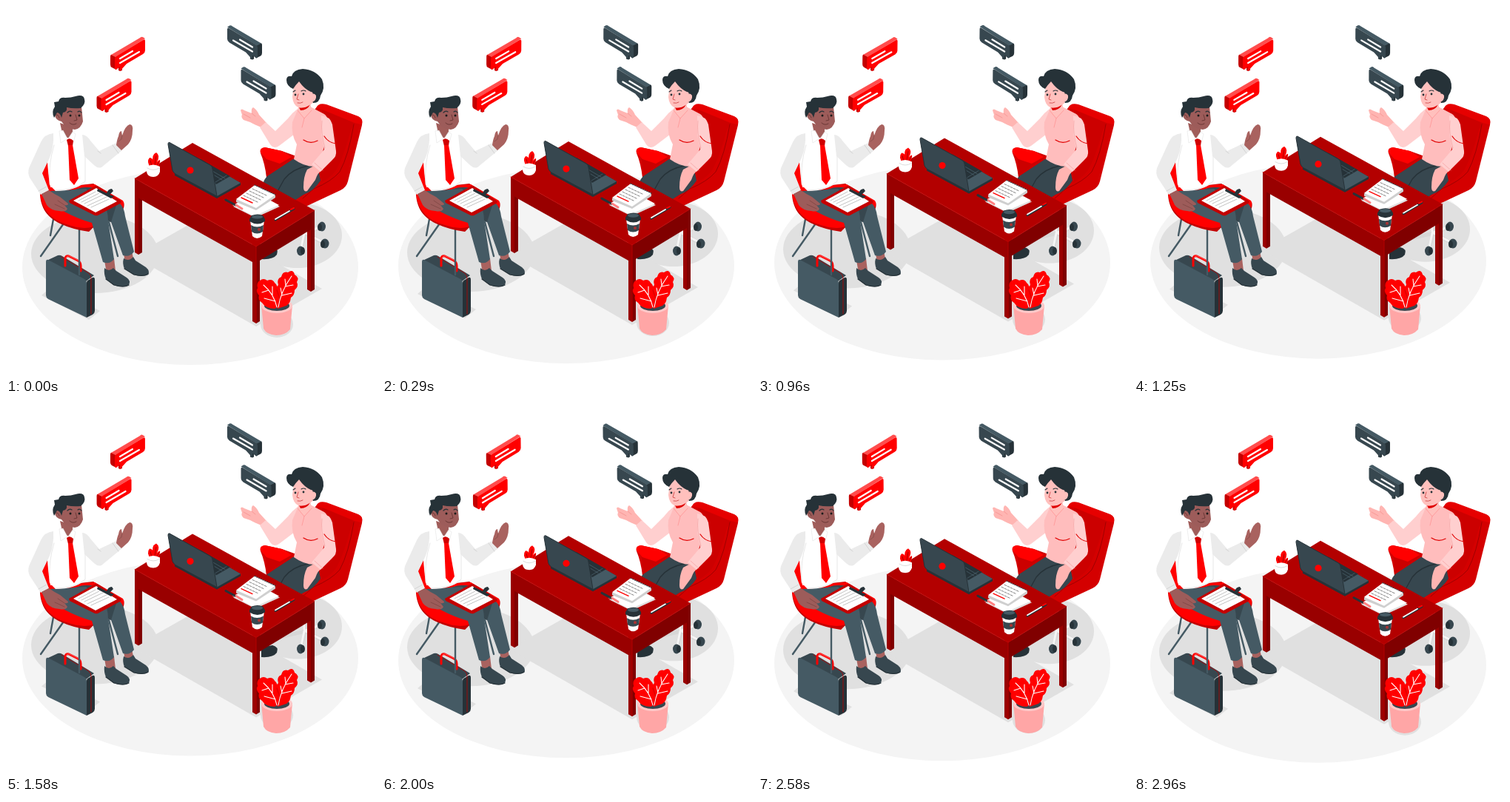
Write an HTML page that moves like this. It is 500x500 px and loops after 3000 ms.

```html
<!DOCTYPE html>
<html lang="en">
<head>
<meta charset="utf-8">
<title>Interview</title>
<style>
html, body { margin: 0; width: 100%; height: 100%; overflow: hidden; background: #fff; }
svg { display: block; width: 100vw; height: 100vh; }
.line { fill: none; stroke-linecap: round; stroke-linejoin: round; }
.red { --front: #f00; --top: #ff4d4d; --side: #c40000; }
.dark { --front: #37474f; --top: #455a64; --side: #263238; }
</style>
</head>
<body>
<svg viewBox="0 0 500 500">
<defs>
  <g id="bubble">
    <path fill="var(--side)" d="M141 68Q141 65 144 66L149 69V86L143 83Q141 82 141 79ZM152 82L157 78V87L154 88L152 87Z"/>
    <path fill="var(--top)" d="M142 66L181 43Q183 41 185 42L188 44L148 69Z"/>
    <path fill="var(--front)" d="M149 68L185 46Q188 44 188 47V60Q188 63 185 65L163 78L154 88V82L149 86Q147 86 147 84V72Q147 69 149 68Z"/>
    <path class="line" stroke="#fff" stroke-width="2.2" d="M154 71L171 61M154 77L180 62"/>
  </g>
</defs>

<g class="float">
  <ellipse cx="249" cy="353" rx="227" ry="132" fill="#f4f4f4"/>
  <g fill="#e0e0e0">
    <ellipse cx="120" cy="335" rx="86" ry="53"/>
    <ellipse cx="394" cy="310" rx="60" ry="44"/>
    <path d="M172 338L262 287L427 382L338 433Z"/>
    <path d="M48 391L62 379L127 412L112 424Z"/>
    <ellipse cx="366" cy="430" rx="22" ry="18"/>
  </g>
</g>

<!-- briefcase -->
<path fill="#37474f" d="M55 344L70 337Q73 336 76 338L119 364L108 372Z"/>
<path fill="#455a64" d="M57 343L106 369Q109 371 109 375V421L57 396Q54 394 54 391V346Q54 342 57 343Z"/>
<path fill="#263238" d="M109 374Q109 371 112 370L117 367Q120 366 120 370V412Q120 415 117 417L109 421Z"/>
<path class="line" stroke="#b00" stroke-width=".8" d="M75 339L112 361Q115 364 115 368V416"/>
<path class="line" stroke="#f00" stroke-width="3" d="M80 351V342Q80 337 85 338L97 344Q101 346 101 351V358"/>
<path class="line" stroke="#ff6b6b" stroke-width=".8" d="M81 341Q82 337 86 338L98 344"/>

<!-- seated man and chair -->
<path class="line" stroke="#455a64" stroke-width="2.4" d="M80 291L47 338M64 288L60 310M99 300V363M139 292L151 338"/>
<path fill="#c40000" d="M46 248C45 270 54 285 73 294Q90 302 112 305L117 300L156 279Q161 272 159 265L118 240Z"/>
<path fill="#f00" d="M48 216Q51 209 58 210L60 245L120 241L158 263Q161 268 157 273L118 298Q104 303 82 295C60 289 47 273 46 251Z"/>
<path fill="#a9625f" d="M133 344L146 341L148 358L136 361ZM159 334L170 331L173 346L161 348Z"/>
<path fill="#37474f" d="M133 354Q139 360 145 354L149 358L163 367Q169 371 166 377Q159 382 145 377L135 369Q132 362 133 354ZM159 341Q166 346 172 339L175 344L189 353Q195 358 192 363Q185 367 172 363L160 355Q157 348 159 341Z"/>
<path class="line" stroke="#263238" stroke-width="1.2" d="M135 369L146 377Q160 381 166 377M160 355L173 363Q186 366 192 362"/>
<path fill="#455a64" d="M94 248Q114 240 135 253L155 268Q160 274 161 284L173 332Q167 340 158 337L142 292L100 275Z"/>
<path fill="#37474f" d="M94 248Q114 240 135 253L150 266L142 292L100 275Z"/>
<path fill="#455a64" d="M60 250L108 247L131 267Q138 275 138 290L146 342Q140 350 131 346L116 293Q98 288 79 278Z"/>
<path fill="#fff" d="M62 173L78 168L98 171Q108 175 108 188V237Q94 250 67 250L59 242Q55 210 55 185Z"/>
<path class="line" stroke="#ddd" stroke-width=".7" d="M107 180V237Q93 249 67 249M59 240Q57 214 65 188"/>
<path fill="#ebebeb" d="M64 172Q52 173 47 184L31 219Q29 226 32 232L47 255L58 249L49 226L59 205Q65 190 64 172ZM103 174Q109 174 114 182L126 196L149 185L157 195L129 218Q124 220 119 215L106 203Z"/>
<path class="line" stroke="#d4d4d4" stroke-width="1" d="M44 250L55 244M144 188L152 199M124 196L128 199"/>
<path fill="#a05d5a" d="M73 158L90 164V176Q82 182 76 172Z"/>
<path fill="#fff" stroke="#ddd" stroke-width=".5" d="M72 169L77 168L83 179L74 185ZM90 170L94 173L91 185L84 179Z"/>
<path fill="#d00000" d="M82 181Q86 177 91 182L90 189L84 189Z"/>
<path fill="#f00" d="M84 188H90L98 233L92 242L86 235Z"/>
<path fill="#9d5c5a" d="M73 136Q87 128 102 136L104 156Q101 166 93 167Q82 167 75 156Q66 154 66 146Q68 140 74 144Z"/>
<path fill="#263238" d="M65 130L71 129Q72 123 80 124Q88 124 94 122Q105 119 106 126Q108 132 101 138Q90 139 82 137Q83 143 77 144L75 151Q73 144 69 144L65 151Q61 143 66 136Z"/>
<path class="line" stroke="#263238" stroke-width="1.2" d="M83 144Q86 141 89 143M97 143Q100 141 102 144"/>
<g fill="#1b1b1b"><circle cx="87" cy="148" r="1.5"/><circle cx="99" cy="148" r="1.5"/></g>
<path class="line" stroke="#6b3836" stroke-width="1" d="M94 147L96 154L92 155M86 158Q90 162 95 159M68 147Q71 147 72 151"/>
<path fill="#a9625f" d="M149 188Q150 180 152 176Q153 169 156 169L157 175Q161 162 167 160Q172 160 171 168Q171 180 165 187L156 195Z"/>
<path class="line" stroke="#874e4a" stroke-width=".8" d="M157 175L156 180L152 183"/>
<path fill="#c40000" d="M85 263L119 244Q122 242 125 244L155 263Q157 265 154 267L124 283Q121 284 118 282L86 266Z"/>
<path fill="#fff" d="M91 263L122 246L150 264L121 279Z"/>
<path class="line" stroke="#c4c4c4" stroke-width="1" d="M98 263L121 251M102 265L126 253M106 267L131 255M110 270L136 258M115 272L139 261"/>
<path fill="#263238" d="M124 247L136 253Q138 247 143 247L145 250L140 255L146 257L142 260L123 250Z"/>
<path fill="#9d5c5a" d="M48 254L58 249Q65 254 73 258L84 267Q84 270 79 269L83 274Q81 279 72 277Q60 276 55 269Z"/>
<path class="line" stroke="#7d4643" stroke-width=".8" d="M70 263L79 269M66 268L79 274"/>

<!-- office chair -->
<path class="line" stroke="#d7d7d7" stroke-width="5" d="M404 272V304M405 307L425 299M405 307L429 320M404 307L399 328M405 307L370 315"/>
<path class="line" stroke="#f5f5f5" stroke-width="3" d="M403 272V304M405 306L424 299M405 307L428 319M403 307L399 326"/>
<g fill="#37474f">
  <ellipse cx="427" cy="298" rx="5" ry="6.5"/><ellipse cx="431" cy="321" rx="5.5" ry="6.5"/><ellipse cx="398" cy="331" rx="5" ry="6.5"/>
</g>
<g fill="#263238">
  <ellipse cx="424" cy="299" rx="3" ry="5"/><ellipse cx="428" cy="322" rx="3" ry="5"/><ellipse cx="401" cy="331" rx="3" ry="5"/>
  <path d="M345 329L360 326Q369 328 366 336Q361 343 345 342Z"/>
</g>
<path fill="#d40000" d="M416 143Q420 131 433 134L477 150Q483 153 481 161L462 237Q460 245 452 249L405 271Q398 273 390 268L352 232Q350 213 344 199Q342 192 350 191L373 196L398 205Z"/>
<path fill="#cc0000" d="M428 136L474 155L466 167Q457 202 446 222Q437 235 415 243L400 258L386 263L352 229L351 207L378 203L419 218Z"/>
<path fill="#f00" d="M344 198Q342 192 350 191L373 196L386 204L370 213L352 207Z"/>
<path fill="#e60000" d="M419 138Q422 130 433 133L476 149Q484 153 480 160L471 158L430 141Z"/>
<path class="line" stroke="#a00000" stroke-width="1" d="M470 160Q463 202 451 224Q440 237 416 247L401 260"/>

<!-- woman -->
<path fill="#37474f" d="M388 207Q404 205 421 216L425 236Q416 250 402 255L385 266L355 251Q346 244 353 235Z"/>
<path fill="#37474f" d="M388 207L353 230Q344 239 349 252L367 260L376 238L397 219Z"/>
<path class="line" stroke="#263238" stroke-width="1.3" d="M408 216Q387 220 376 234L366 252"/>
<path fill="#ffb5b2" d="M345 164Q335 160 330 157L321 154Q317 150 319 147L317 141Q318 138 322 141L332 145Q331 138 334 137Q339 140 342 147L352 158Z"/>
<path class="line" stroke="#f58e8c" stroke-width=".7" d="M321 146L330 151M332 145L337 149"/>
<path fill="#ffcfcf" d="M394 139Q387 144 381 152L364 169L351 157L343 164L357 187Q362 194 369 189L390 173Z"/>
<path fill="#ffbdbd" d="M395 138L411 136L430 146Q438 151 434 170L424 216Q407 220 389 207L393 187Q385 174 387 157Z"/>
<path fill="#ffc0bd" d="M397 125L411 129L413 142L403 151L394 142Z"/>
<path fill="#e00000" d="M396 137Q404 138 411 133Q407 141 398 141Z"/>
<path class="line" stroke="#ff9999" stroke-width=".9" d="M394 141L403 152L413 141M403 152L400 164"/>
<path class="line" stroke="#e00000" stroke-width="1.2" d="M402 181Q411 187 421 182"/>
<path fill="#ffb5b2" d="M407 221L422 213L428 221Q421 225 418 235L407 250Q402 252 402 245Q402 230 407 221Z"/>
<path fill="#ffcfcf" d="M426 148Q438 149 441 160L446 196Q447 203 441 208L425 224L413 214L430 194L426 174Z"/>
<path class="line" stroke="#e00000" stroke-width="1.2" d="M430 176Q436 185 446 186"/>
<path class="line" stroke="#f5a5a5" stroke-width=".8" d="M427 155Q425 171 431 192M417 212L428 222"/>
<path fill="#ffc0bd" d="M390 100L414 104L419 122Q417 131 410 134Q403 139 395 137Q388 134 387 123Z"/>
<path fill="#263238" d="M388 112Q379 108 379 100Q379 94 386 95Q388 86 401 85Q418 86 427 99Q432 111 425 121Q424 131 415 131L413 125Q417 116 412 116Q403 112 396 102Q391 107 388 112Z"/>
<path fill="#ffc0bd" d="M412 121Q416 116 419 121Q420 128 413 130Z"/>
<path class="line" stroke="#263238" stroke-width="1.1" d="M388 116L391 114M399 115Q402 113 405 115"/>
<g fill="#263238"><circle cx="391" cy="120" r="1.4"/><circle cx="402" cy="119" r="1.4"/></g>
<path class="line" stroke="#d65555" stroke-width="1" d="M395 119L393 126L396 127M394 131Q398 132 401 130"/>

<!-- desk and objects on it -->
<g class="float">
  <path fill="#990000" d="M174 233L179 236V336L174 333ZM407 282L412 279V386L407 383Z"/>
  <path fill="#800000" d="M179 236L184 239V333L179 336ZM412 279L417 276V383L412 386Z"/>
  <path fill="#990000" d="M174 233L338 325V347L333 346L183 262L174 256Z"/>
  <path fill="#800000" d="M338 325L417 276V299L338 347Z"/>
  <path fill="#990000" d="M333 321L338 325V429L333 426Z"/>
  <path fill="#800000" d="M338 325L343 321V426L338 429Z"/>
  <path fill="#b30000" d="M174 233L252 185L417 276L338 325Z"/>
  <path class="line" stroke="#c40000" stroke-width=".7" d="M174 233L338 325L417 276M338 325V428"/>

  <!-- small plant -->
  <path fill="#f00" d="M196 220Q189 210 194 205Q199 205 199 212Q196 201 203 198Q209 202 204 211Q209 205 208 211Q207 216 203 221Z"/>
  <path class="line" stroke="#900000" stroke-width=".8" d="M200 220L203 203M198 219L195 209M202 219L207 210"/>
  <path fill="#fff" d="M190 217Q199 212 208 217V224Q206 231 199 231Q191 231 190 224Z"/>
  <path class="line" stroke="#ddd" stroke-width="1" d="M191 219Q199 224 207 219"/>

  <!-- laptop -->
  <path fill="#263238" d="M228 227L260 207L317 239V242L285 260L228 229Z"/>
  <path fill="#455a64" d="M228 226L260 206L317 239L285 257Z"/>
  <path fill="#263238" d="M258 209L263 207L303 230L284 241L276 228Z"/>
  <path class="line" stroke="#546e7a" stroke-width=".6" d="M279 223L296 233M282 229L292 235M283 238L298 229"/>
  <path fill="#37474f" stroke="#263238" stroke-width="1" d="M222 185L276 215Q279 217 279 220L285 257L229 227Q226 225 225 222L219 187Q219 183 222 185Z"/>
  <circle cx="249" cy="222" r="4.6" fill="#f00"/>

  <!-- papers and pens -->
  <path fill="#e0e0e0" d="M307 271L341 257L370 271L337 286Z"/>
  <path fill="#fff" d="M306 269L341 254L369 269L335 284Z"/>
  <path fill="#cfcfcf" d="M311 262L336 244L364 256V259L338 276L311 265Z"/>
  <path fill="#fff" d="M311 261L336 242L364 255L338 273Z"/>
  <path class="line" stroke="#777" stroke-width=".9" stroke-dasharray="3 1.5" d="M333 247L352 256M329 250L348 259M325 253L344 262M321 256L340 265"/>
  <path class="line" stroke="#f00" stroke-width="1.4" d="M318 259L333 266"/>
  <path class="line" stroke="#37474f" stroke-width="1.3" stroke-dasharray="1 2" d="M336 242L364 255"/>
  <path class="line" stroke="#263238" stroke-width="3" d="M297 262L310 269"/>
  <path class="line" stroke="#ff8080" stroke-width="3" d="M311 269L319 274"/>
  <path class="line" stroke="#263238" stroke-width="3" d="M364 289L389 274"/>
  <path class="line" stroke="#fff" stroke-width="1.8" d="M364 288L383 277"/>
  <path class="line" stroke="#f00" stroke-width="2" d="M385 275L389 273"/>

  <!-- cup -->
  <path fill="#fff" d="M330 290H349L346 311Q339 317 333 311Z"/>
  <path fill="#37474f" d="M331 296Q339 301 348 296L347 305Q339 310 332 305Z"/>
  <circle cx="342" cy="302" r="2" fill="#a33"/>
  <path fill="#263238" d="M329 288L332 283Q340 280 347 283L350 288V291Q340 298 329 291Z"/>
  <ellipse cx="339.5" cy="285" rx="7.5" ry="2.6" fill="#455a64"/>
</g>

<!-- potted plant -->
<path fill="#ffa6a6" d="M345 404H387L384 437Q377 445 365 445Q352 444 348 436Z"/>
<ellipse cx="366" cy="405" rx="21" ry="10" fill="#ffc9c9"/>
<ellipse cx="366" cy="405" rx="17" ry="7" fill="#37474f"/>
<path fill="#f00" d="M363 409Q351 409 346 401Q340 398 342 391Q337 386 340 381Q338 374 343 371Q348 367 353 371Q360 368 363 374Q368 378 366 384L369 392Q373 404 363 409Z"/>
<path fill="#f00" d="M367 409Q362 394 366 388Q363 382 368 377Q365 369 372 366Q374 358 381 360Q388 355 390 363Q397 367 393 373Q396 379 390 384Q390 391 385 394Q384 404 376 406Z"/>
<path class="line" stroke="#c40000" stroke-width=".8" d="M366 384L369 393Q372 402 367 408"/>
<path class="line" stroke="#fff" stroke-width="1.1" d="M366 407Q362 389 348 377M360 390L360 379M355 384L346 387M364 399L349 395M368 407Q371 386 386 365M373 391L371 381M378 378L377 369M377 379L388 377M373 391L386 388"/>

<g id="red" class="red"><use href="#bubble"/><use href="#bubble" transform="translate(-18.5 56)"/></g>
<g id="dark" class="dark"><use href="#bubble" transform="matrix(-1 0 0 1 487 -15.5)"/><use href="#bubble" transform="matrix(-1 0 0 1 505.5 40.5)"/></g>
</svg>
<script>
const floats = document.querySelectorAll('.float');
const red = document.getElementById('red'), dark = document.getElementById('dark');

function draw() {
  const p = performance.now() % 3000 / 3000;
  const lift = 10 * (1 - Math.abs(1 - 2 * p));
  const angle = Math.asin(Math.sin(2 * Math.PI * p)) * 2 / Math.PI;
  for (const g of floats) g.setAttribute('transform', `translate(0 ${-lift})`);
  red.setAttribute('transform', `rotate(${angle} 155 92)`);
  dark.setAttribute('transform', `rotate(${angle} 331 77)`);
  requestAnimationFrame(draw);
}
draw();
</script>
</body>
</html>
```
